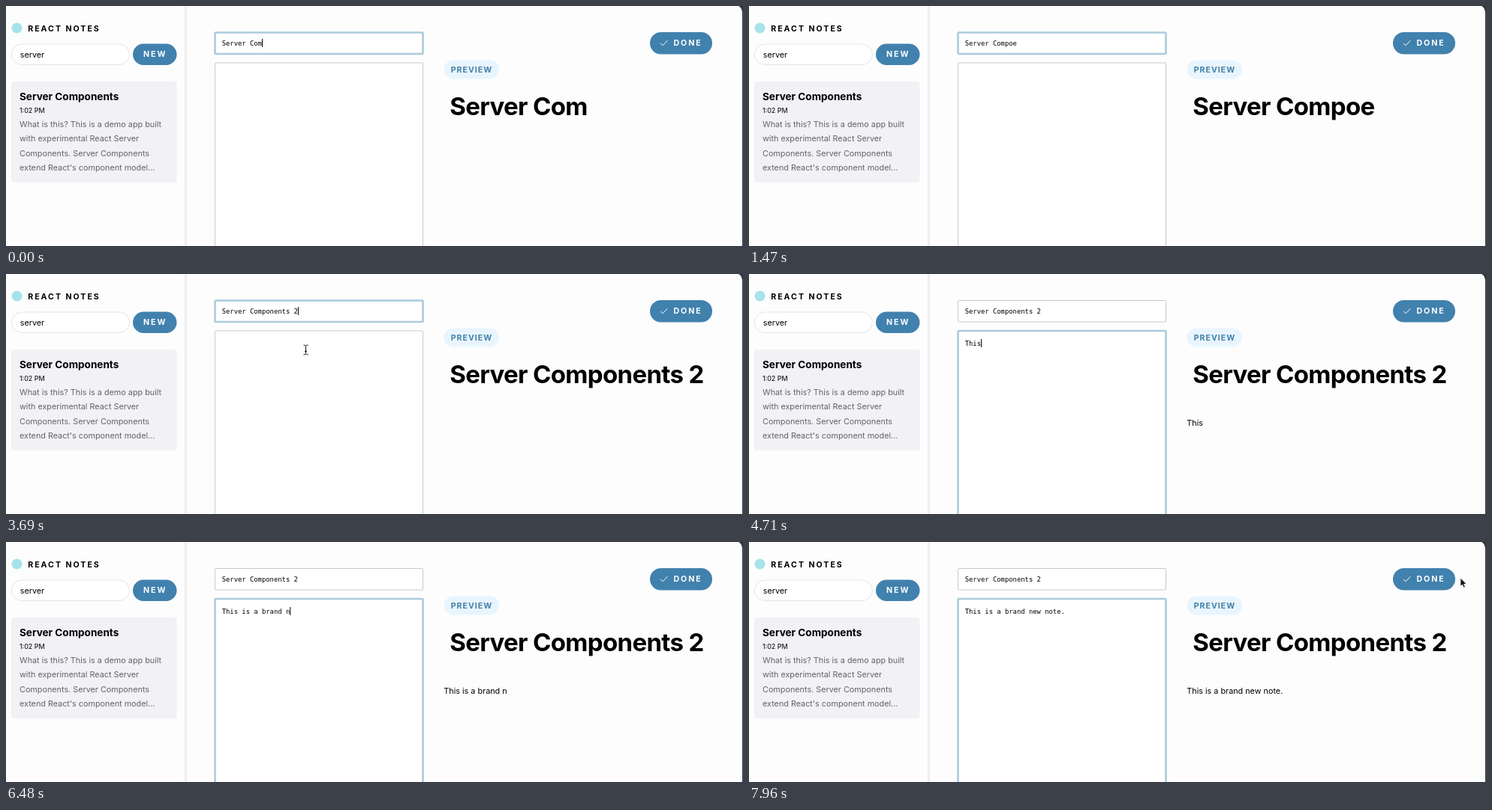
Recreate the animation shown at these times as an HTML page. Size 982 px wide and 321 px high, loop 8000 ms.

```html
<!DOCTYPE html>
<html lang="en">
<head>
<meta charset="utf-8">
<title>Notes editor</title>
<style>
  html, body { margin: 0; width: 100%; height: 100%; overflow: hidden; background: #fdfdfd; }
  svg { display: block; width: 982px; height: 321px; }
  text { font: 10.8px Inter, sans-serif; white-space: pre; }
  .label { font-size: 10.6px; font-weight: 700; letter-spacing: 2px; }
  .light { fill: #fff; }
  .heading { font-size: 33px; font-weight: 700; letter-spacing: -.65px; }
  .card-title { font-size: 13.55px; font-weight: 700; }
  .time { font-size: 9px; }
  .summary { fill: #626469; }
  .mono { font: 8.85px "DejaVu Sans Mono", monospace; }
  .field { fill: #fff; stroke: #c5c9cd; stroke-width: 1; }
  .field.focus { stroke: #aacbdc; stroke-width: 2.6; }
  .button { fill: #4181ae; }
</style>
</head>
<body>
<svg viewBox="0 0 982 321">
  <defs>
    <linearGradient id="edge">
      <stop offset="0" stop-color="#e9e9eb"/>
      <stop offset="1" stop-color="#f6f6f7"/>
    </linearGradient>
  </defs>
  <rect width="982" height="321" fill="#fdfdfd"/>
  <rect x="238" width="3.5" height="321" fill="url(#edge)"/>
  <path d="M976 0Q980.5 2 981 9V321H982V0Z" fill="#33353a"/>

  <circle cx="14.5" cy="29.5" r="7" fill="#a6e3ea"/>
  <text class="label" x="29.2" y="33.6">REACT NOTES</text>
  <rect x="7.5" y="51" width="157" height="27.5" rx="13.75" fill="#fff" stroke="#e3e4e8"/>
  <text x="18.7" y="68.7">server</text>
  <rect class="button" x="169" y="50.5" width="58.5" height="28.5" rx="14.25"/>
  <text class="label light" x="183" y="68.4">NEW</text>

  <rect x="7" y="101" width="220.5" height="135" rx="4" fill="#f1f1f6"/>
  <text class="card-title" x="18" y="126">Server Components</text>
  <text class="time" x="17.9" y="142.8">1:02 PM</text>
  <g id="summary"></g>

  <rect id="titleField" class="field" x="278.5" y="35.5" width="277" height="28.5" rx="1"/>
  <rect id="bodyField" class="field" x="278.5" y="76" width="277" height="260" rx="1"/>
  <text id="titleInput" class="mono" x="287.7" y="52.6"></text>
  <text id="bodyInput" class="mono" x="287.7" y="95.8"></text>
  <rect id="caret" width="1" height="11"/>

  <rect class="button" x="858" y="35" width="83" height="29.5" rx="14.75"/>
  <path d="M872 49.8l3 3 6.3-6.6" fill="none" stroke="#fff"/>
  <text class="label light" x="889.4" y="53.4">DONE</text>
  <rect x="583.5" y="72.5" width="73.5" height="25" rx="12.5" fill="#e9f5fe"/>
  <text class="label" x="592.7" y="88.9" style="letter-spacing:1px" fill="#4180a8">PREVIEW</text>
  <text id="heading" class="heading" x="591.2" y="146"></text>
  <text id="paragraph" x="583.3" y="203.1"></text>

  <path id="ibeam" d="M-3-6Q0-6 0-4.5Q0-6 3-6M0-4.5V5.5M-3 7Q0 7 0 5.5Q0 7 3 7M-1.5 2.5H1.5"
        fill="none" stroke="#111"/>
  <path id="arrow" d="M0 0V11L2.5 8.7 4.3 12.8 6.3 12 4.5 8H8Z" fill="#111" stroke="#fff" stroke-width=".7"/>
</svg>
<script>
const LOOP = 8000, CHAR = 8.85 * .602, TEXT_X = 287.7;
const $ = id => document.getElementById(id);

// Each track is a list of [start in ms, value]; a value holds until the next start.
const titleTrack = [
  [0, 'Com'], [150, 'Comp'], [300, 'Compo'], [440, 'Compoe'], [590, 'Compoent'], [740, 'Compoents'],
  [1030, 'Compoent'], [1180, 'Compoen'], [1470, 'Compoe'], [1620, 'Compo'],
  [2660, 'Compon'], [2810, 'Componen'], [2950, 'Components'], [3240, 'Components '], [3540, 'Components 2']
];
const bodyTrack = [
  [0, ''], [4270, 'T'], [4420, 'Th'], [4560, 'Thi'], [4710, 'This'], [4860, 'This '], [5000, 'This is'],
  [5150, 'This is a'], [5300, 'This is a '], [5450, 'This is a b'], [5590, 'This is a barn'],
  [6040, 'This is a b'], [6190, 'This is a bra'], [6330, 'This is a brand'], [6480, 'This is a brand n'],
  [6780, 'This is a brand ne'], [6930, 'This is a brand new no'], [7070, 'This is a brand new note.']
];
const focusTrack = [[0, 'title'], [3830, 'body']];
const caretTrack = [[0, true], [1320, false], [1620, true], [2070, false], [2660, true], [7370, false]];
const mouseTrack = [
  [0, null], [3690, ['ibeam', 399.5, 101]], [4270, null],
  [7370, ['ibeam', 430, 117]], [7520, ['arrow', 640, 112]], [7660, ['arrow', 850, 104]],
  [7810, ['arrow', 959, 80]], [7960, ['arrow', 948, 48.3]]
];

const at = (track, t) => track.findLast(([start]) => start <= t)[1];

$('summary').innerHTML = [
  'What is this? This is a demo app built',
  'with experimental React Server',
  'Components. Server Components',
  "extend React's component model..."
].map((line, i) => `<text class="summary" x="18" y="${162 + i * 19.3}">${line}</text>`).join('');

function draw(t) {
  const title = 'Server ' + at(titleTrack, t);
  const body = at(bodyTrack, t);
  const inBody = at(focusTrack, t) === 'body';
  const mouse = at(mouseTrack, t);

  $('titleInput').textContent = $('heading').textContent = title;
  $('bodyInput').textContent = $('paragraph').textContent = body;
  $('titleField').classList.toggle('focus', !inBody);
  $('bodyField').classList.toggle('focus', inBody);

  const caret = $('caret');
  caret.setAttribute('x', TEXT_X + (inBody ? body : title).length * CHAR);
  caret.setAttribute('y', inBody ? 87 : 44);
  caret.style.display = at(caretTrack, t) ? '' : 'none';

  for (const kind of ['ibeam', 'arrow']) {
    const shown = mouse && mouse[0] === kind;
    $(kind).style.display = shown ? '' : 'none';
    if (shown) $(kind).setAttribute('transform', `translate(${mouse[1]} ${mouse[2]})`);
  }
}

const begin = performance.now();
function tick() {
  draw((performance.now() - begin) % LOOP);
  requestAnimationFrame(tick);
}
tick();
</script>
</body>
</html>
```
